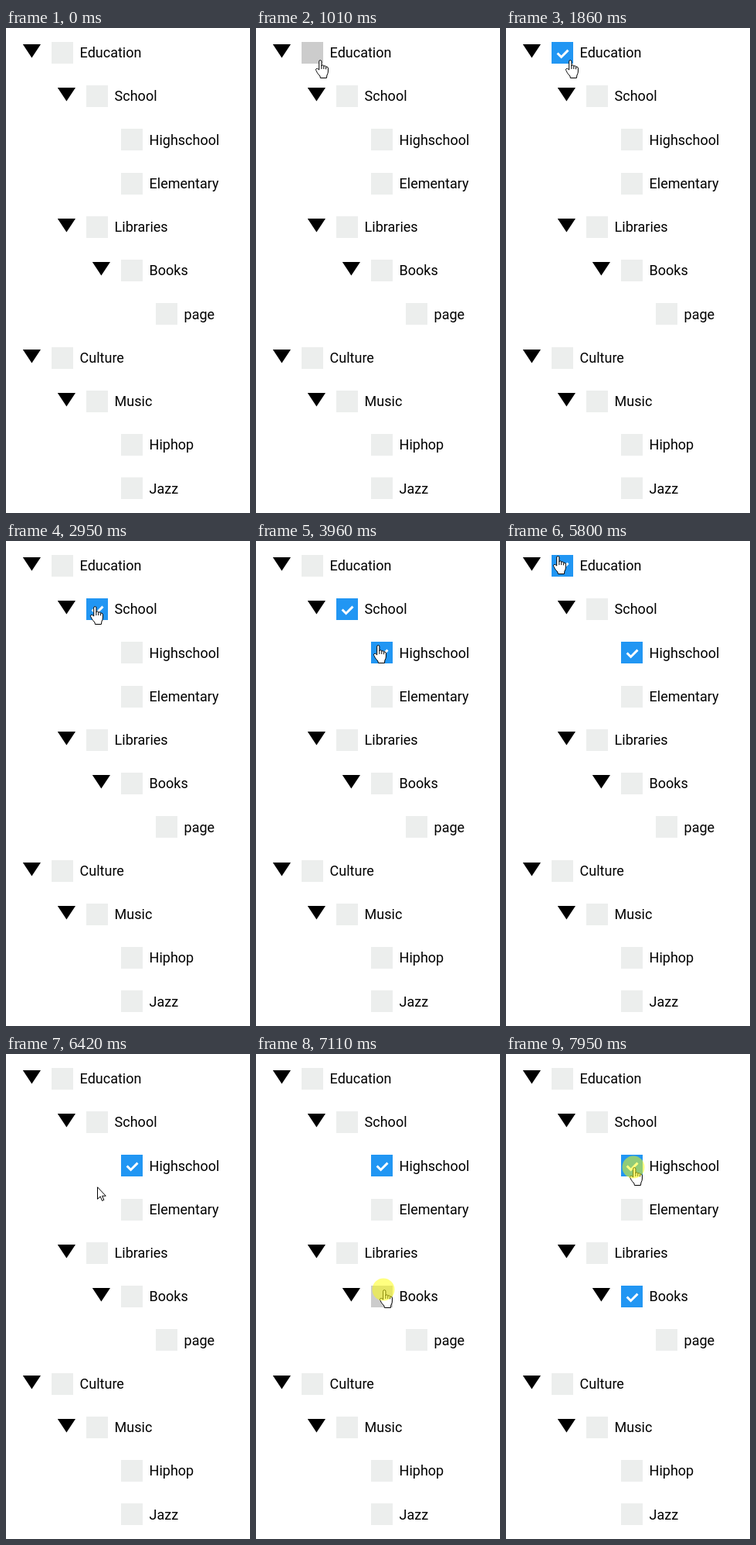
Recreate the animation shown at these times as an HTML page. Size 316 by 626 pixels, loop 8000 ms.

```html
<!DOCTYPE html>
<html lang="en">
<head>
<meta charset="utf-8">
<title>Checkbox tree</title>
<style>
  html, body { margin: 0; width: 100%; height: 100%; overflow: hidden; background: #fff; }
  svg { display: block; }
  text { font: 18px Roboto, Arial, sans-serif; fill: #000; }
  .cursor { fill: #fff; stroke: #000; stroke-linejoin: round; }
</style>
</head>
<body>
<svg width="316" height="626" viewBox="0 0 316 626">
  <g id="tree"></g>
  <path id="arrow" class="cursor" d="M.5 .8V16.3L4.2 12.9L6.5 18.4L8.8 17.4L6.6 12.2H11.3Z"/>
  <g id="hand" class="cursor">
    <path d="M-1.3 13V2.2Q-1.3 .6 .3 .6Q1.9 .6 1.9 2.2V8Q2 6.7 3.4 6.8Q4.8 7 4.8 8.6Q5.1 7.6 6.3 7.8Q7.6 8 7.6 9.6Q8 8.8 9 9.1Q10.4 9.5 10.4 11V15Q10.4 17.5 8.9 20L8.4 23.5H.4L-.1 21Q-3.1 18 -3.9 16.3Q-4.7 14.5 -5.4 13.3Q-5.9 12 -4.8 11.5Q-3.5 11 -2.5 12Z"/>
    <path d="M1.9 8V12M4.8 8.6V12M7.6 9.6V12.3"/>
  </g>
  <circle id="halo" cx="-1" r="14.5" fill="#ff0" fill-opacity=".5"/>
</svg>
<script>
const LOOP = 8000, TICK = 77.2;
const SIZE = 28, TOP = 17.9, PITCH = 56.25, INDENT = 45;

// One dash per level of nesting
const outline = `Education
-School
--Highschool
--Elementary
-Libraries
--Books
---page
Culture
-Music
--Hiphop
--Jazz`;

const rows = outline.split("\n").map((line, i) => {
  const label = line.replace(/^-*/, "");
  const depth = line.length - label.length;
  const top = TOP + PITCH * i;
  return { label, depth, x: 59 + INDENT * depth, y: Math.round(top), baseline: Math.round(top + 20.2) };
});

const byId = id => document.getElementById(id);
const [tree, arrow, hand, halo] = ["tree", "arrow", "hand", "halo"].map(byId);

function add(tag, attrs, text = "") {
  const el = document.createElementNS("http://www.w3.org/2000/svg", tag);
  for (const name in attrs) el.setAttribute(name, attrs[name]);
  el.textContent = text;
  return tree.appendChild(el);
}

rows.forEach((row, i) => {
  const { x, y, label, depth, baseline } = row;
  const isParent = rows[i + 1]?.depth > depth;
  if (isParent) add("path", { d: `M${x - 37.2} ${y + 3}h23.2l-11.6 17.6z` });
  row.box = add("rect", { x, y, width: SIZE, height: SIZE });
  row.mark = add("path", {
    d: `M${x + 7.6} ${y + 14.5}l5 5l8.9 -8.9`,
    fill: "none", stroke: "#fff", "stroke-width": 3
  });
  add("text", { x: x + 36.6, y: baseline }, label);
});

const rowAt = ({ x, y }) => rows.find(row =>
  x >= row.x && x < row.x + SIZE && y >= row.y && y < row.y + SIZE);

// The pointer's walk, with durations in ticks
const moves = [], clicks = [];
let now = 1, here = { x: 242, y: 574 };

function wait(ticks) { now += ticks; }

function move(ticks, x, y) {
  const to = { x, y };
  moves.push({ start: now, ticks, from: here, to });
  now += ticks;
  here = to;
}

function click(hold = 2) {
  const press = now + 1;
  now = press + hold;
  clicks.push({ press, release: now, row: rowAt(here) });
}

move(4, 111, 126); wait(2);
move(3, 88, 51); wait(1);
move(2, 83, 41); click();
move(4, 124, 96);
move(4, 83, 41);
move(2, 72, 28); click();
move(6, 115, 84); click();
move(7, 167, 145); click(); wait(2);
move(5, 78, 37); click();
move(4, 118, 85);
move(1, 117, 86); click();
move(4, 50, 0); wait(1);
move(4, 67, 19);
move(2, 69, 24); click();
move(3, 118, 171); wait(1);
move(7, 166, 304); click(3);
move(7, 166, 146); click();

function pointerAt(tick) {
  const current = moves.filter(m => m.start <= tick).pop();
  if (!current) return null;
  const { start, ticks, from, to } = current;
  const p = Math.min(1, (tick - start) / ticks), eased = p * p * (3 - 2 * p);
  const mix = axis => Math.round(from[axis] + (to[axis] - from[axis]) * eased);
  return { x: mix("x"), y: mix("y") };
}

const show = (el, on) => el.setAttribute("visibility", on ? "visible" : "hidden");

function render(time) {
  const tick = Math.floor((time + 4) / TICK);
  const pointer = pointerAt(tick);
  const over = pointer && rowAt(pointer);

  for (const row of rows) {
    const toggles = clicks.filter(c => c.row === row && c.release <= tick);
    const checked = toggles.length % 2 === 1;
    row.box.setAttribute("fill", checked ? "#2196f3" : row === over ? "#ccc" : "#eceeed");
    show(row.mark, checked);
  }

  show(arrow, pointer && !over);
  show(hand, over);
  show(halo, clicks.some(c => c.press <= tick && tick < c.release));
  if (pointer) {
    for (const el of [arrow, hand, halo]) {
      el.setAttribute("transform", `translate(${pointer.x} ${pointer.y})`);
    }
  }
}

const start = performance.now();
function frame() {
  render((performance.now() - start) % LOOP);
  requestAnimationFrame(frame);
}
frame();
</script>
</body>
</html>
```
